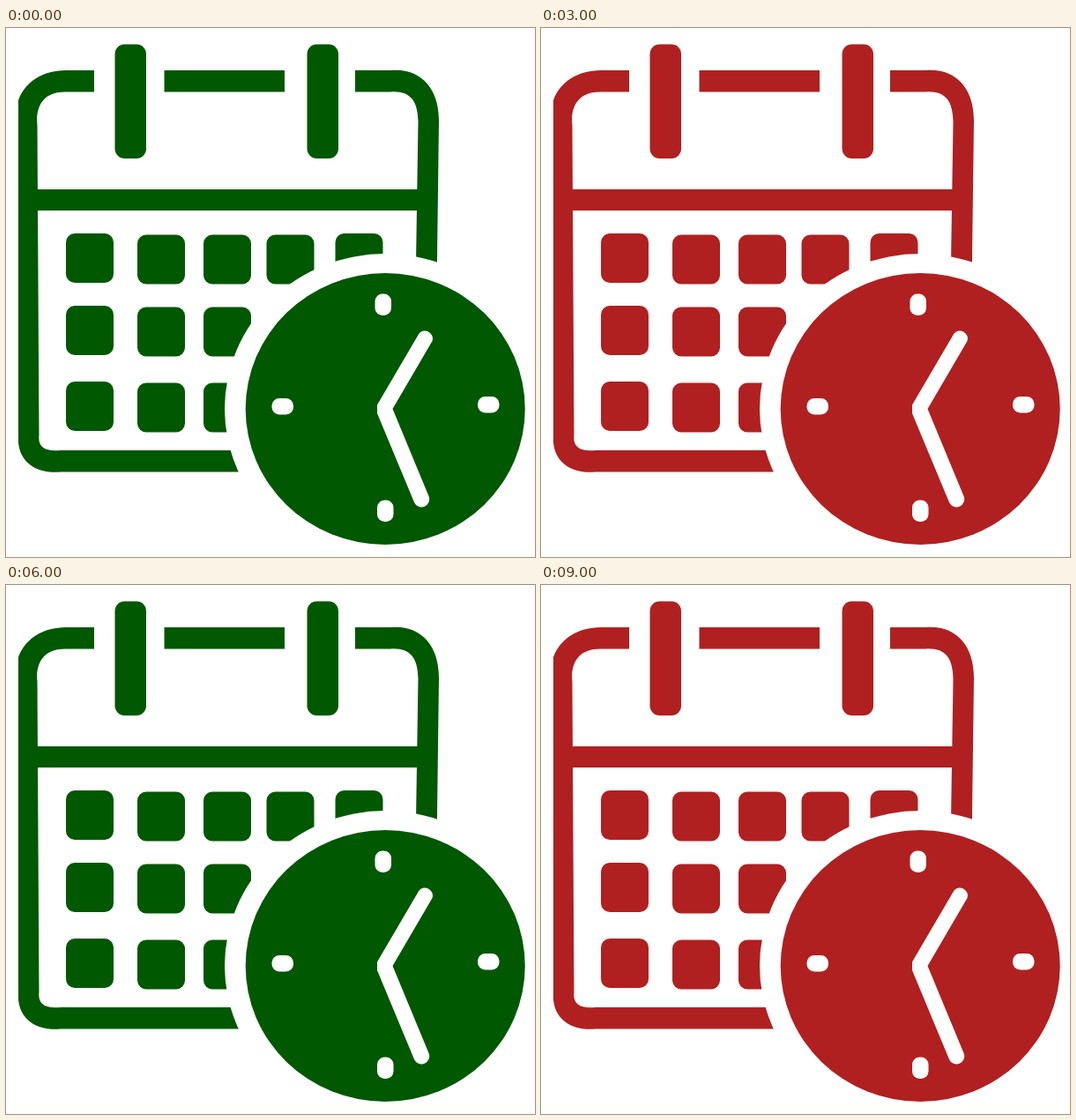
Recreate the animation shown at these times as an HTML page. Size 600 px wide and 600 px high, loop 10000 ms.

```html
<!DOCTYPE html>
<html lang="en">
<head>
<meta charset="utf-8">
<title>Calendar and clock</title>
<style>
  html, body { margin: 0; width: 100%; height: 100%; overflow: hidden; background: #fff; }
  svg { display: block; width: 100%; height: 100%; }
</style>
</head>
<body>
<svg id="icon" viewBox="0 0 600 600" fill="#005800">
  <!-- calendar frame -->
  <path d="M100 48H68C41 48 21 62 14 82V470C16 493 35 506 62 503.5H300V479H62C43 481 36 474 37.5 462L35.5 110C33 86 45 71 70 72.5H100Z"/>
  <path d="M396 48H436C470 45 491 68 491 105L488.5 300H464.5L467.5 106C467 82 458 71 436 72.5H396Z"/>
  <path d="M179.5 48H316V72.5H179.5ZM30 183H472V207H30Z"/>
  <rect x="123.5" y="18.5" width="35.5" height="129.5" rx="11"/>
  <rect x="341.5" y="18.5" width="35.5" height="129.5" rx="11"/>
  <g id="days"></g>

  <!-- clock -->
  <ellipse cx="430" cy="432" rx="182" ry="176" fill="#fff"/>
  <ellipse cx="430.2" cy="432" rx="158.5" ry="154"/>
  <g fill="#fff">
    <rect x="418.5" y="301.5" width="18.5" height="24.5" rx="8.5"/>
    <rect x="421" y="535.5" width="18.5" height="24.5" rx="8.5"/>
    <rect x="301.5" y="420" width="24.5" height="18.5" rx="8.5"/>
    <rect x="535" y="418" width="24.5" height="18.5" rx="8.5"/>
    <path d="M468.5 346.5A8.8 8.8 0 0 1 483.5 355L438.5 432L479.5 531A8.8 8.8 0 0 1 463 538L421 437V427.5Z"/>
  </g>
</svg>
<script>
  const icon = document.getElementById('icon');
  const columns = [68, 149, 224, 295.5, 373.5];
  const rows = [233, 315, 401];
  const colors = ['#005800', '#b02020'];

  const day = (x, y) => `<rect x="${x}" y="${y}" width="54" height="56" rx="10"/>`;
  document.getElementById('days').innerHTML = rows.map((y, row) =>
    columns.slice(0, row ? 3 : 5)
      .map((x, col) => day(x, y + (col % 4 ? 1.5 : 0)))
      .join('')
  ).join('');

  // The color switches hard once per second.
  const start = performance.now();
  function draw() {
    const second = Math.floor((performance.now() - start) / 1000);
    icon.setAttribute('fill', colors[second % 2]);
    requestAnimationFrame(draw);
  }
  draw();
</script>
</body>
</html>
```
